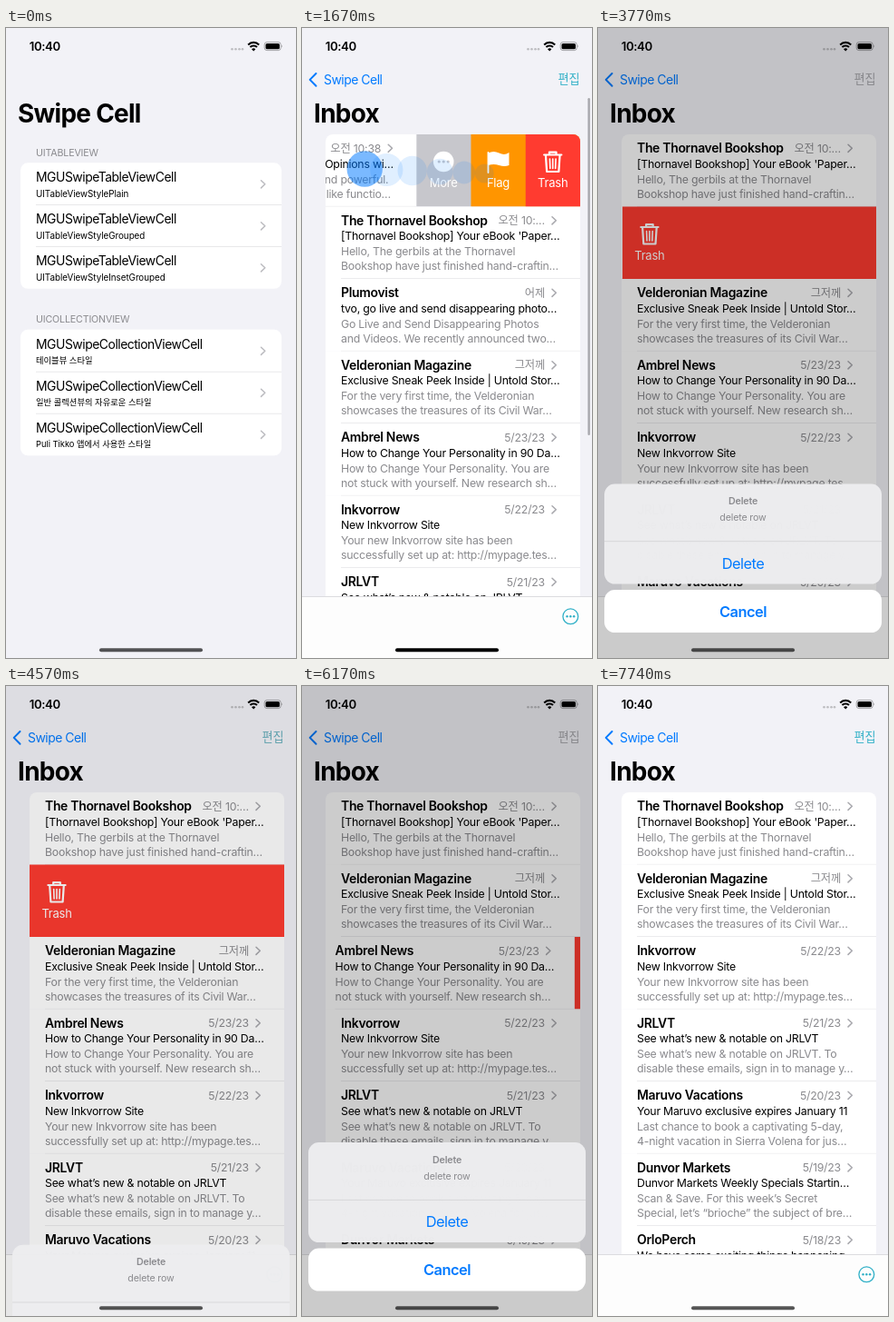
These frames come from a looping animation (320x693 px, 7770 ms). An HTML page:

```html
<!DOCTYPE html>
<html lang="ko">
<head>
<meta charset="utf-8">
<title>Swipe Cell</title>
<style>
html, body { margin: 0; width: 100%; height: 100%; overflow: hidden; background: #f2f2f7; }
svg { display: block; width: 100%; height: 100%; }
text { font-family: Inter, "Noto Sans CJK KR", "Noto Sans CJK", sans-serif; white-space: pre; }
.large { font-size: 27.9px; font-weight: 700; letter-spacing: -.025em; }
.clock { font-size: 13.2px; font-weight: 600; letter-spacing: -.03em; }
.body { font-size: 13.95px; letter-spacing: -.035em; }
.head { font-size: 13.95px; font-weight: 600; letter-spacing: -.022em; }
.sub { font-size: 12.3px; letter-spacing: -.018em; }
.label { font-size: 13px; letter-spacing: -.018em; fill: #fff; }
.edit { font-size: 13.1px; }
.foot { font-size: 10.67px; letter-spacing: -.015em; }
.cap { font-size: 9.85px; letter-spacing: -.005em; }
.capko { font-size: 9.3px; }
.button { font-size: 16.4px; letter-spacing: -.03em; fill: #007aff; }
.gray { fill: #8a8a8e; }
.bold { font-weight: 600; }
</style>
</head>
<body>
<svg id="stage" viewBox="0 0 320 693" preserveAspectRatio="none"></svg>
<script>
const LOOP = 7770, ROW = 79.5, LIST_W = 281;
const BG = '#f2f2f7', LINE = '#dedee1', BLUE = '#007aff', RED = '#ff3b30';

const mails = [
  ['Quemo', '오전 10:38', 'Video: Operators and Strong Opinions wi…',
    'Many operators are flexible and powerful.', 'They’re symbols that behave like functio…'],
  ['The Thornavel Bookshop', '오전 10:…', "[Thornavel Bookshop] Your eBook 'Paper…",
    'Hello, The gerbils at the Thornavel', 'Bookshop have just finished hand-craftin…'],
  ['Plumovist', '어제', 'tvo, go live and send disappearing photo…',
    'Go Live and Send Disappearing Photos', 'and Videos. We recently announced two…'],
  ['Velderonian Magazine', '그저께', 'Exclusive Sneak Peek Inside | Untold Stor…',
    'For the very first time, the Velderonian', 'showcases the treasures of its Civil War…'],
  ['Ambrel News', '5/23/23', 'How to Change Your Personality in 90 Da…',
    'How to Change Your Personality. You are', 'not stuck with yourself. New research sh…'],
  ['Inkvorrow', '5/22/23', 'New Inkvorrow Site',
    'Your new Inkvorrow site has been', 'successfully set up at: http://mypage.tes…'],
  ['JRLVT', '5/21/23', 'See what’s new & notable on JRLVT',
    'See what’s new & notable on JRLVT. To', 'disable these emails, sign in to manage y…'],
  ['Maruvo Vacations', '5/20/23', 'Your Maruvo exclusive expires January 11',
    'Last chance to book a captivating 5-day,', '4-night vacation in Sierra Volena for jus…'],
  ['Dunvor Markets', '5/19/23', 'Dunvor Markets Weekly Specials Startin…',
    'Scan & Save. For this week’s Secret', 'Special, let’s “brioche” the subject of bre…'],
  ['OrloPerch', '5/18/23', 'We have some exciting things happening…',
    'Take a look at what is coming to your', 'office this summer and save on all of…'],
];

// Touches: visible from `on` to `off`, moving from x0 to x1 between m0 and m1.
const touches = [
  { on: 400, off: 510, x0: 200, x1: 200, y: 263, m0: 400, m1: 500 },
  { on: 1230, off: 1840, x0: 250, x1: 12, y: 155, m0: 1377, m1: 1827 },
  { on: 2900, off: 3400, x0: 267, x1: 12, y: 238, m0: 2960, m1: 3390 },
  { on: 4270, off: 4390, x0: 160, x1: 160, y: 589, m0: 4270, m1: 4390 },
  { on: 5480, off: 5870, x0: 267, x1: 12, y: 316, m0: 5520, m1: 5860 },
  { on: 6830, off: 6950, x0: 160, x1: 160, y: 589, m0: 6830, m1: 6950 },
];
const swipes = [
  { row: 0, touch: touches[1], rest: -LIST_W, k: .03, collapse: 1960 },
  { row: 2, touch: touches[2], rest: -LIST_W, k: .014, collapse: 4656 },
  { row: 4, touch: touches[4], rest: 0, k: .0185, collapse: 7216 },
];
const sheets = [{ show: 3400, hide: 4400 }, { show: 5870, hide: 6960 }];

const clamp = v => Math.max(0, Math.min(1, v));
const ramp = (t, a, b) => clamp((t - a) / (b - a));
const lerp = (a, b, p) => a + (b - a) * p;
const inOut = p => p < .5 ? 2 * p * p : 1 - 2 * (1 - p) ** 2;
const spring = (t, k) => t <= 0 ? 0 : 1 - (1 + k * t) * Math.exp(-k * t);

const text = (x, y, str, cls, attrs = '') => `<text x="${x}" y="${y}" class="${cls}" ${attrs}>${str}</text>`;
const rect = (x, y, w, h, fill, attrs = '') => `<rect x="${x}" y="${y}" width="${w}" height="${h}" fill="${fill}" ${attrs}/>`;
const chevron = (x, y, color = '#bcbcc0') =>
  `<path d="M${x} ${y - 4.1}l4.3 4.1l-4.3 4.1" fill="none" stroke="${color}" stroke-width="1.5" stroke-linecap="round" stroke-linejoin="round"/>`;
const dots = (cx, cy, gap, r, fill) =>
  [-gap, 0, gap].map(d => `<circle cx="${cx + d}" cy="${cy}" r="${r}" fill="${fill}"/>`).join('');
const END = 'text-anchor="end"', MID = 'text-anchor="middle"';

function homeCard(y, header, rows) {
  const items = rows.map(([title, caption, cls], i) => {
    const top = y + i * 46;
    return (i ? rect(33, top, 271, .7, LINE) : '') + text(33, top + 20.8, title, 'body') +
      text(33, top + 37.3, caption, cls) + chevron(281.5, top + 23.5);
  });
  return text(33, y - 7.6, header, 'foot gray') + rect(16, y, 288, 138.5, '#fff', 'rx="8"') + items.join('');
}

const home = () => rect(0, 0, 320, 693, BG) + text(13, 104, 'Swipe Cell', 'large') +
  homeCard(148.3, 'UITABLEVIEW', ['Plain', 'Grouped', 'InsetGrouped'].map(
    s => ['MGUSwipeTableViewCell', 'UITableViewStyle' + s, 'cap'])) +
  `<path id="press" d="M16 240.7H304V278.8a8 8 0 0 1-8 8H24a8 8 0 0 1-8-8Z" fill="#000"/>` +
  homeCard(331.8, 'UICOLLECTIONVIEW', ['테이블뷰 스타일', '일반 콜렉션뷰의 자유로운 스타일',
    'Puli Tikko 앱에서 사용한 스타일'].map(s => ['MGUSwipeCollectionViewCell', s, 'capko']));

const icons = {
  More: color => `<circle cy="30" r="11.3" fill="#fff"/>` + dots(0, 30, 5, 1.6, color),
  Flag: () => `<path d="M-11 20v22" stroke="#fff" stroke-width="1.8" stroke-linecap="round"/>
    <path d="M-11 20.5q6-3 12 0t11-.5v14q-5 2-11 0t-12 0Z" fill="#fff"/>`,
  Trash: () => `<g fill="none" stroke="#fff" stroke-width="2.2" stroke-linecap="round" stroke-linejoin="round">
    <path d="M-9.6 22.5h19.2M-3.8 22v-2.4h7.6v2.4M-7.8 23l1.2 18h13.2l1.2-18"/>
    <path d="M-3.3 27l.4 10.5M0 27v10.5M3.3 27l-.4 10.5" stroke-width="1.6"/></g>`,
};
const action = (name, color) => `<g>${rect(0, 0, 320, ROW, color)}
  <g transform="translate(30 0)">${icons[name](color)}${text(0, 58, name, 'label', MID)}</g></g>`;
const actions = () => `<g class="actions">${
  action('More', '#c7c7cc') + action('Flag', '#ff9500') + action('Trash', RED)}</g>`;

const mailRow = ([from, date, subject, line1, line2], i) => `<g id="row${i}">
  ${swipes.some(s => s.row === i) ? actions() : ''}
  <g class="cell">${rect(0, 0, LIST_W, ROW + .3, '#fff')}
    ${text(17, 20.2, from, 'head')}${text(242, 19.7, date, 'sub gray', END)}${chevron(250, 15.3, '#a8a8ad')}
    ${text(17, 36.7, subject, 'sub')}${text(17, 53.5, line1, 'sub gray')}${text(17, 69.8, line2, 'sub gray')}
    ${rect(17, ROW - .6, LIST_W - 17, .7, LINE)}</g></g>`;

const inbox = () => rect(0, 0, 320, 693, BG) +
  `<path d="M15.5 50l-6.8 6.9l6.8 6.9" fill="none" stroke="${BLUE}" stroke-width="2" stroke-linecap="round" stroke-linejoin="round"/>` +
  text(24, 61.6, 'Swipe Cell', 'body', `fill="${BLUE}"`) +
  text(306.5, 61, '편집', 'edit tint', END) + text(13, 104, 'Inbox', 'large') +
  `<g clip-path="url(#list)"><g transform="translate(26 117)">${mails.map(mailRow).join('')}</g></g>` +
  rect(315.4, 77, 2.4, 371, '#8e8e93', 'id="scroller" rx="1.2"') +
  rect(0, 625, 320, 68, '#fdfdfd') + rect(0, 625, 320, .7, '#cfcfd3') +
  `<g id="more"><circle cx="296.3" cy="647.3" r="8.4" fill="none" stroke="currentColor" stroke-width="1.3"/>
    ${dots(296.3, 647.3, 3.8, 1.2, 'currentColor')}</g>`;

const sheet = () => rect(7, 501.5, 306, 110, '#ededef', 'rx="11.5" fill-opacity=".99"') +
  text(160, 524, 'Delete', 'foot bold gray', MID) + text(160, 542, 'delete row', 'foot gray', MID) +
  rect(7, 564.4, 306, .6, '#c9c9cc') +
  '<path id="pressDelete" d="M7 565H313V600a11.5 11.5 0 0 1-11.5 11.5H18.5A11.5 11.5 0 0 1 7 600Z"/>' +
  text(160, 594.8, 'Delete', 'button', MID) +
  rect(7, 618, 306, 47, '#fff', 'rx="11.5"') + text(160, 647.6, 'Cancel', 'button bold', MID);

const statusBar = () => text(42.8, 25, '10:40', 'clock', MID) +
  [249.5, 253.5, 257.5, 261].map(x => `<circle cx="${x}" cy="23.3" r="1.3" fill="#000" opacity=".22"/>`).join('') +
  `<g fill="none" stroke="#000" stroke-width="2.1"><path d="M267.2 18.4a8.4 8.4 0 0 1 12 0M269.4 21a5.4 5.4 0 0 1 7.6 0"/></g>
   <path d="M273.2 25.6l-2.2-2.3a3.1 3.1 0 0 1 4.4 0Z"/>
   <rect x="285.2" y="15.6" width="18" height="9" rx="2.7" fill="none" stroke="#000" stroke-opacity=".4" stroke-width=".8"/>` +
  rect(286.5, 16.9, 15.4, 6.4, '#000', 'rx="1.6"') + '<path d="M304.2 18.6q1.3 1.5 0 3Z" opacity=".45"/>';

const stage = document.getElementById('stage');
stage.innerHTML = `<defs><clipPath id="list"><path d="M26 640V125a8 8 0 0 1 8-8H299a8 8 0 0 1 8 8V640Z"/></clipPath></defs>
  <g id="home">${home()}</g>${rect(0, 0, 320, 693, '#000', 'id="pushDim"')}<g id="inbox">${inbox()}</g>
  ${statusBar()}${rect(0, 0, 320, 693, '#000', 'id="dim"')}<g id="sheet">${sheet()}</g>
  ${rect(103, 682.3, 114, 4, '#000', 'id="indicator" rx="2"')}<g id="touch"></g>`;

const $ = id => document.getElementById(id);
const set = (el, name, value) => el.setAttribute(name, value);
const move = (el, x, y = 0) => set(el, 'transform', `translate(${x.toFixed(2)} ${y.toFixed(2)})`);
const show = (el, on) => { el.style.display = on ? '' : 'none'; };
const rowEls = mails.map((_, i) => $('row' + i));

const touchX = (touch, t) => lerp(touch.x0, touch.x1, inOut(ramp(t, touch.m0, touch.m1)));

function swipeOffset({ touch, rest, k }, t) {
  const drag = touchX(touch, Math.min(t, touch.off)) - touch.x0;
  const offset = lerp(drag, rest, spring(t - touch.off, k));
  return Math.abs(offset - rest) < .4 && t > touch.off ? rest : offset;
}

function drawActions(rowEl, swipe, t, offset) {
  const group = rowEl.querySelector('.actions');
  show(group, offset < -.05);
  const edge = LIST_W + offset;
  const expandAt = lerp(swipe.touch.m0, swipe.touch.m1, .72);
  const expand = inOut(ramp(t, expandAt, expandAt + 170));
  [...group.children].forEach((el, i) => {
    const part = i === 2 ? 2 * (1 - expand) : i;
    move(el, edge - offset * part / 3);
    show(el, i === 2 || expand < 1);
  });
}

function drawRows(t) {
  let y = 0;
  rowEls.forEach((el, i) => {
    const swipe = swipes.find(s => s.row === i);
    let height = ROW, offset = 0;
    if (swipe) {
      offset = swipeOffset(swipe, t);
      height *= 1 - inOut(ramp(t, swipe.collapse, swipe.collapse + 450));
      drawActions(el, swipe, t, offset);
    }
    move(el, 0, y);
    move(el.querySelector('.cell'), offset);
    show(el, height > 0);
    y += height;
  });
}

function drawSheet(t) {
  const shown = sheets.reduce((sum, s) =>
    sum + spring(t - s.show, .027) * (1 - inOut(ramp(t, s.hide, s.hide + 320))), 0);
  move($('sheet'), 0, 200 * (1 - shown));
  show($('sheet'), shown > 0);
  set($('dim'), 'opacity', .2 * shown);
  const tint = `rgb(${lerp(48, 166, shown)},${lerp(176, 166, shown)},${lerp(199, 171, shown)})`;
  stage.querySelector('.tint').style.fill = tint;
  $('more').style.color = tint;
  const pressed = [touches[3], touches[5]].some(p => t >= p.on + 30 && t < p.off);
  set($('pressDelete'), 'opacity', pressed ? .07 : 0);
}

function drawTouch(t) {
  const dot = (x, y, r, alpha) => `<circle cx="${x}" cy="${y}" r="${r}" fill="${BLUE}" opacity="${alpha}"/>`;
  $('touch').innerHTML = touches.filter(p => t >= p.on && t < p.off + 130).map(p => {
    const x = touchX(p, t), fade = 1 - ramp(t, p.off, p.off + 130);
    let out = '';
    for (let k = 5; k > 0; k--) {
      const past = touchX(p, t - 30 * k);
      if (past - x > 1) out += dot(past, p.y + k, 20 - 1.9 * k, .12 * fade);
    }
    return out + dot(x, p.y, 19.7, .52 * fade);
  }).join('');
}

function draw(t) {
  const push = t > 1130 ? 1 : spring(t - 520, .013);
  move($('home'), -96 * push);
  show($('home'), push < 1);
  set($('pushDim'), 'opacity', .1 * push);
  move($('inbox'), 320 * (1 - push));
  show($('inbox'), push > 0);
  set($('press'), 'opacity', t >= 430 && t < 1200 ? .17 : 0);
  set($('scroller'), 'opacity', .75 * ramp(t, 900, 1000) * (1 - ramp(t, 1980, 2230)));
  const dark = ramp(t, 700, 1000) * (1 - ramp(t, 2150, 2450));
  set($('indicator'), 'opacity', lerp(.66, 1, dark));
  drawRows(t);
  drawSheet(t);
  drawTouch(t);
}

const start = performance.now();
function frame() {
  draw((performance.now() - start) % LOOP);
  requestAnimationFrame(frame);
}
frame();
</script>
</body>
</html>
```
